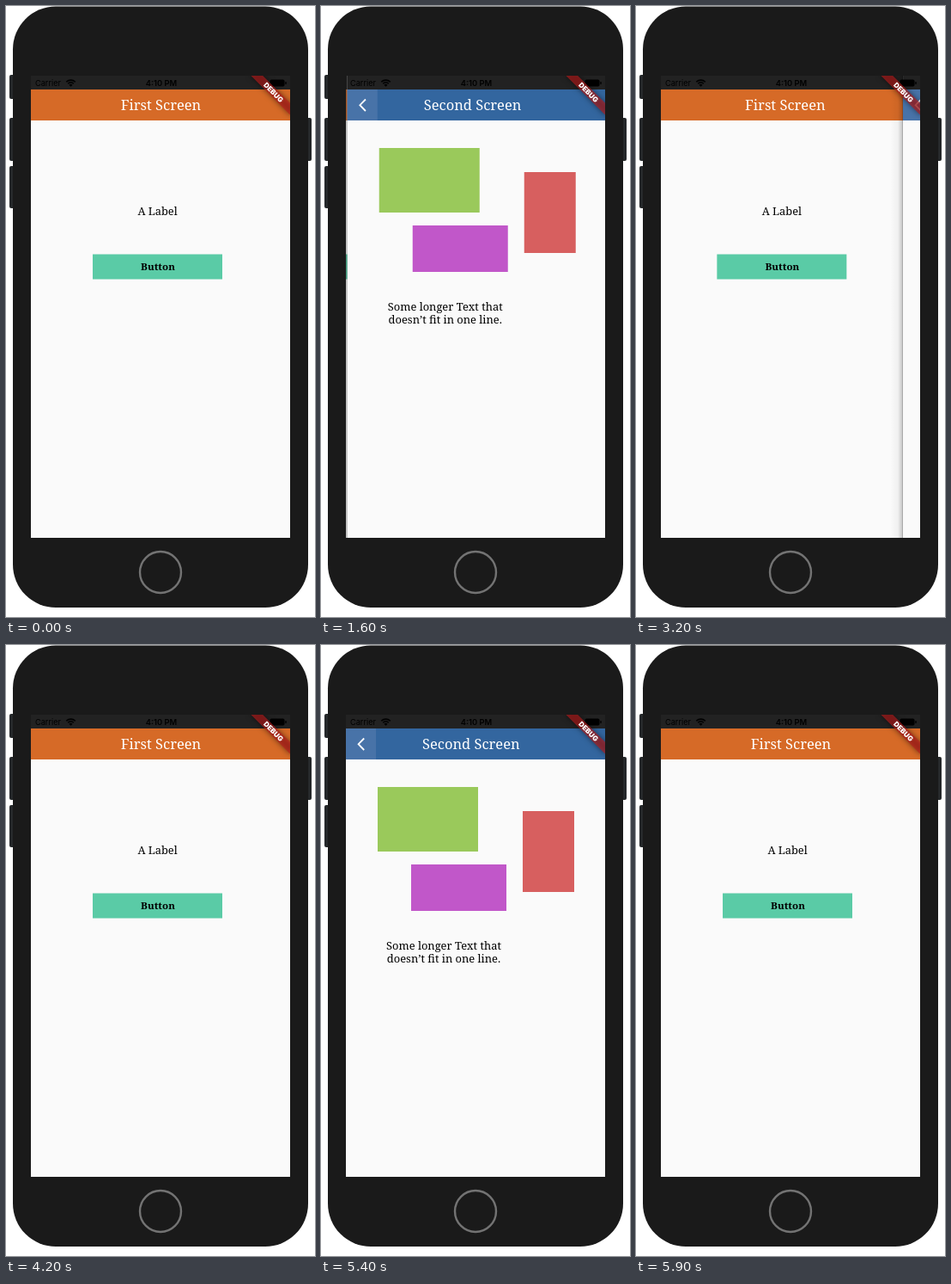
An HTML page with a canvas that plays this animation: 360 by 710 pixels, repeating every 6000 ms.

```html
<!DOCTYPE html>
<html lang="en">
<head>
<meta charset="utf-8">
<title>Page transition</title>
<style>
  html, body { margin: 0; width: 100%; height: 100%; overflow: hidden; background: #fff; }
  canvas { display: block; width: 360px; height: 710px; }
</style>
</head>
<body>
<canvas id="stage"></canvas>
<script>
const W = 360, H = 710, LOOP = 6000, STEP = 100;
const SCREEN = { x: 29, y: 81, w: 302, h: 537 };
const SLIDE = 368;
const SERIF = '"Noto Serif", serif';
const SANS = 'Inter, sans-serif';

// Each move starts at a time and shows from its first sampled step on.
const MOVES = [
  { start: 1253, shown: 1400, open: true },
  { start: 2908, shown: 3000, open: false },
  { start: 4208, shown: 4300, open: true },
  { start: 5408, shown: 5500, open: false }
];

const canvas = document.getElementById('stage');
const ctx = canvas.getContext('2d');
const ratio = window.devicePixelRatio || 1;
canvas.width = W * ratio;
canvas.height = H * ratio;

// cubic-bezier(0, 0, 0.58, 1)
function easeOut(x) {
  if (x <= 0) return 0;
  if (x >= 1) return 1;
  let lo = 0, hi = 1;
  for (let i = 0; i < 24; i++) {
    const s = (lo + hi) / 2;
    if (1.74 * s * s * (1 - s) + s * s * s < x) lo = s; else hi = s;
  }
  return lo * lo * (3 - 2 * lo);
}

function openness(t) {
  let value = 0;
  for (const m of MOVES) {
    if (t < m.shown) break;
    const p = easeOut((t - m.start) / SLIDE);
    value = m.open ? p : 1 - p;
  }
  return value;
}

function rect(x, y, w, h, color) {
  ctx.fillStyle = color;
  ctx.fillRect(x, y, w, h);
}

function roundRect(x, y, w, h, r, color) {
  ctx.fillStyle = color;
  ctx.beginPath();
  ctx.roundRect(x, y, w, h, r);
  ctx.fill();
}

function text(str, x, y, font, color = '#000', align = 'center') {
  ctx.font = font;
  ctx.fillStyle = color;
  ctx.textAlign = align;
  ctx.fillText(str, x, y);
}

function drawPhone() {
  const key = '#25282a';
  roundRect(4, 80, 8, 28, 2, key);
  roundRect(4, 130, 8, 50, 2, key);
  roundRect(4, 186, 8, 49, 2, key);
  roundRect(348, 130, 8, 50, 2, key);
  roundRect(8, 0.5, 344, 698.5, 50, '#1a1a1a');
  ctx.strokeStyle = '#737373';
  ctx.lineWidth = 2.4;
  ctx.beginPath();
  ctx.arc(180, 658, 24, 0, Math.PI * 2);
  ctx.stroke();
}

function drawPage(bar, title, titleX) {
  rect(SCREEN.x, SCREEN.y, SCREEN.w, SCREEN.h, '#fafafa');
  rect(SCREEN.x, SCREEN.y, SCREEN.w, 16, '#222222');
  rect(SCREEN.x, 97, SCREEN.w, 36, bar);
  return () => text(title, titleX, 120.5, '16.5px ' + SERIF, '#fff');
}

function drawFirst() {
  drawPage('#d66a27', 'First Screen', 180.5)();
  text('A Label', 176.5, 242.5, '12.8px ' + SERIF);
  rect(101, 288.5, 151, 29, '#5acba6');
  text('Button', 177, 307, 'bold 11.6px ' + SERIF);
}

function drawSecond() {
  const title = drawPage('#33669f', 'Second Screen', 174.8);
  rect(29, 97, 35, 36, '#4873a8');
  title();
  ctx.strokeStyle = '#fff';
  ctx.lineWidth = 1.8;
  ctx.beginPath();
  ctx.moveTo(50.2, 108.5);
  ctx.lineTo(43.6, 115.2);
  ctx.lineTo(50.2, 122);
  ctx.stroke();
  rect(66, 165, 117, 75, '#9ac95b');
  rect(235, 193, 60, 94, '#d75f5f');
  rect(105, 255, 111, 54, '#c157c9');
  text('Some longer Text that', 143, 354, '12.9px ' + SERIF);
  text('doesn’t fit in one line.', 143, 368.5, '12.9px ' + SERIF);
}

function drawEdgeShadow() {
  const g = ctx.createLinearGradient(14, 0, 29, 0);
  g.addColorStop(0, 'rgba(0,0,0,0)');
  g.addColorStop(0.6, 'rgba(0,0,0,0.04)');
  g.addColorStop(0.9, 'rgba(0,0,0,0.18)');
  g.addColorStop(1, 'rgba(0,0,0,0.4)');
  rect(14, SCREEN.y, 15, SCREEN.h, g);
}

function drawStatus() {
  text('Carrier', 34, 93, '9.2px ' + SANS, '#000', 'left');
  text('4:10 PM', 181, 93, '600 9.4px ' + SANS);
  ctx.strokeStyle = '#000';
  ctx.lineWidth = 1.6;
  for (const r of [4.6, 7.4]) {
    ctx.beginPath();
    ctx.arc(75.5, 93.5, r, -Math.PI * 0.75, -Math.PI * 0.25);
    ctx.stroke();
  }
  ctx.fillStyle = '#000';
  ctx.beginPath();
  ctx.moveTo(75.5, 93.8);
  ctx.arc(75.5, 93.8, 2.8, -Math.PI * 0.75, -Math.PI * 0.25);
  ctx.fill();
  roundRect(307.5, 85.5, 17, 8, 1.8, '#000');
  roundRect(325.3, 88, 1.4, 3, 0.6, '#000');
}

function drawRibbon() {
  ctx.save();
  ctx.translate(SCREEN.x + SCREEN.w, SCREEN.y);
  ctx.rotate(Math.PI / 4);
  // Only the shadow of the far-off bar lands on the screen.
  ctx.save();
  ctx.shadowColor = 'rgba(0,0,0,0.5)';
  ctx.shadowBlur = 6.4 * ratio;
  ctx.shadowOffsetX = 2000 * ratio;
  const far = 2000 * Math.SQRT1_2;
  rect(-32.2 - far, 22.5 + far, 64.4, 9.7, '#000');
  ctx.restore();
  rect(-32.2, 22.5, 64.4, 9.7, 'rgba(183,28,28,0.627)');
  text('DEBUG', 0, 30.3, '900 8.2px ' + SANS, '#fff');
  ctx.restore();
}

function draw(t) {
  const p = openness(Math.floor(t / STEP) * STEP);
  ctx.setTransform(ratio, 0, 0, ratio, 0, 0);
  rect(0, 0, W, H, '#fff');
  drawPhone();
  ctx.save();
  ctx.beginPath();
  ctx.rect(SCREEN.x, SCREEN.y, SCREEN.w, SCREEN.h);
  ctx.clip();
  if (p < 1) {
    ctx.save();
    ctx.translate(-p * SCREEN.w / 3, 0);
    drawFirst();
    ctx.restore();
  }
  if (p > 0) {
    ctx.save();
    ctx.translate((1 - p) * SCREEN.w, 0);
    if (p < 1) drawEdgeShadow();
    drawSecond();
    ctx.restore();
  }
  drawStatus();
  drawRibbon();
  ctx.restore();
}

const begin = performance.now();
function tick() {
  draw((performance.now() - begin) % LOOP);
  requestAnimationFrame(tick);
}
tick();
</script>
</body>
</html>
```
